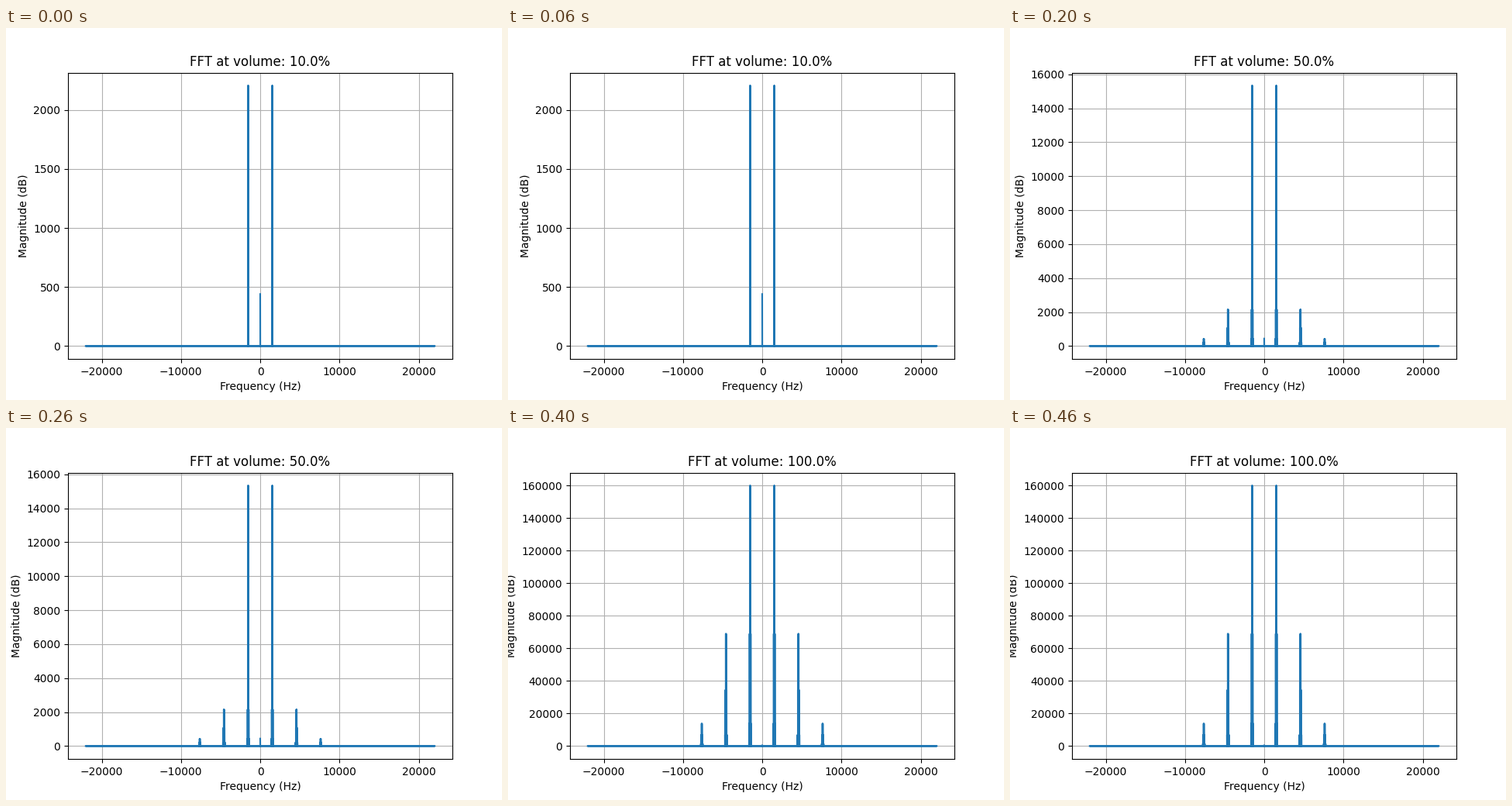
A matplotlib script for the animation above (0.5 s loop, 640x480 px).

```python
import numpy as np
import matplotlib.pyplot as plt
from matplotlib.animation import FuncAnimation

RATE = 44100
TONES = (1500, 1550)
DC_OFFSET = 0.01
VOLUMES = (0.1, 0.3, 0.5, 0.7, 1.0)

time = np.arange(RATE) / RATE
freqs = np.fft.fftfreq(RATE, 1 / RATE)
two_tone = sum(np.sin(2 * np.pi * f * time) for f in TONES)


def spectrum(volume):
    """Magnitude of the two-tone signal after fifth-order distortion."""
    x = volume * two_tone
    return np.abs(np.fft.fft(x + x**5 + DC_OFFSET))


spectra = [spectrum(v) for v in VOLUMES]

fig, ax = plt.subplots(figsize=(6.4, 4.8), dpi=100)


def draw(i):
    ax.clear()
    ax.plot(freqs, spectra[i])
    ax.set_title(f"FFT at volume: {VOLUMES[i] * 100:.1f}%")
    ax.set_xlabel("Frequency (Hz)")
    ax.set_ylabel("Magnitude (dB)")
    ax.grid(True)
    return ax.get_children()


def reset():
    return draw(0)


anim = FuncAnimation(fig, draw, frames=len(VOLUMES), init_func=reset,
                     interval=100, repeat=True, repeat_delay=0)
plt.show()
```
